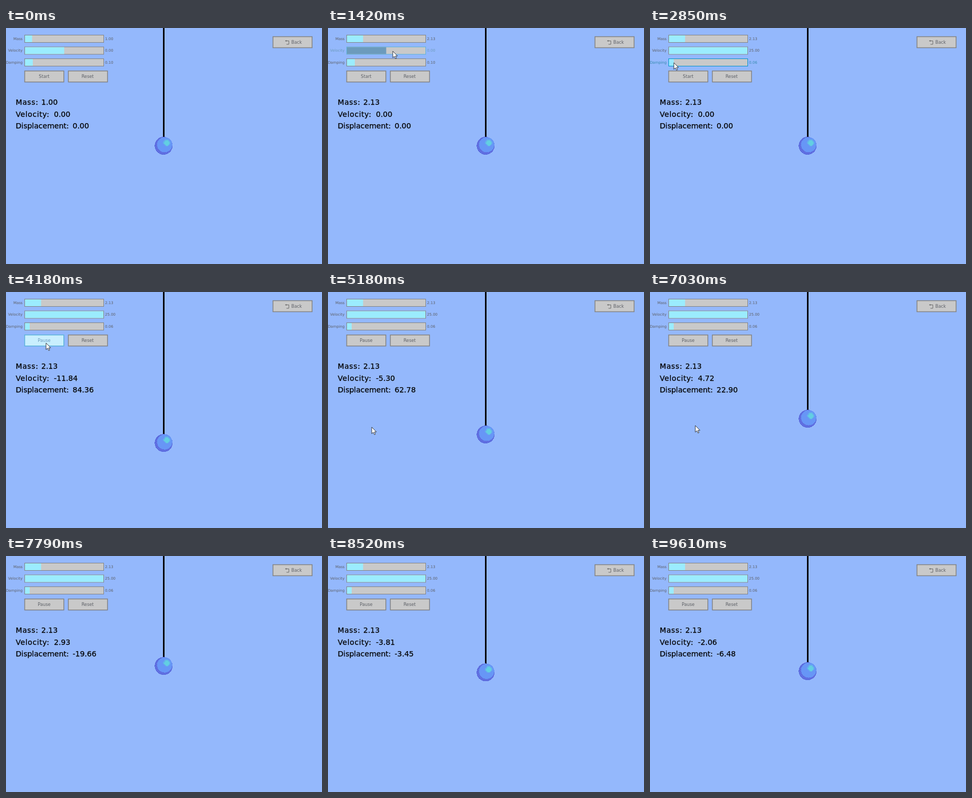
An HTML page that plays this animation: 600x449 px, repeating every 9.64 s.

```html
<!DOCTYPE html>
<html lang="en">
<head>
<meta charset="utf-8">
<title>Damped spring</title>
<style>
  html, body { margin: 0; width: 100%; height: 100%; overflow: hidden; background: #94b8fc; }
  svg { display: block; width: 600px; height: 449px; }
  text { font-family: "DejaVu Sans", sans-serif; white-space: pre; }
  .ui { --line: #838383; --base: #c9c9c9; --ink: #5e6168; --bar: #9becfe; }
  .ui.hot { --line: #5bb2d9; --base: #c9effe; --ink: #6c9bbc; --bar: #6c9bbc; }
  .ui.held { --line: #0492c7; --base: #97e8ff; --ink: #368baf; --bar: #97e8ff; }
  .ui text { fill: var(--ink); font-size: 7px; }
  .ui .box { fill: #c9c9c9; stroke: var(--line); }
  .ui .bar { fill: var(--bar); }
  .button .box { fill: var(--base); stroke-width: 1.5; }
  .button text { font-size: 8.3px; text-anchor: middle; }
  .end { text-anchor: end; }
  .stats { font-size: 14px; stroke: #000; stroke-width: .25; }
  .loose { letter-spacing: .6px; }
</style>
</head>
<body>
<svg viewBox="0 0 600 449" xmlns="http://www.w3.org/2000/svg">
  <defs>
    <pattern id="speck" width="4" height="4" patternUnits="userSpaceOnUse">
      <path d="M0 0h1.5v1.5h-1.5zM2 2h1.5v1.5h-1.5z" fill="#7283ee"/>
    </pattern>
    <pattern id="glint" width="3" height="3" patternUnits="userSpaceOnUse">
      <path d="M0 0h1.5v1.5h-1.5zM1.5 1.5h1.5v1.5h-1.5z" fill="#5fd0e0"/>
    </pattern>
  </defs>
  <rect width="600" height="449" fill="#94b8fc"/>

  <g id="sliders"></g>

  <g class="ui button" id="start">
    <rect class="box" x="35.5" y="81.7" width="74.3" height="21"/>
    <text id="startText" x="72.5" y="95">Start</text>
  </g>
  <g class="ui button">
    <rect class="box" x="118.4" y="81.7" width="74.3" height="21"/>
    <text x="155" y="95">Reset</text>
  </g>
  <g class="ui button">
    <rect class="box" x="506.9" y="16.5" width="74.3" height="21"/>
    <path d="M530 24.5h7v6.5h-4.5M532 23v3" fill="none" stroke="#686868"/>
    <text x="551.8" y="30">Back</text>
  </g>

  <g class="stats">
    <text class="loose" x="18.5" y="146">Mass:</text><text id="massOut" x="67" y="146"></text>
    <text class="loose" x="18.5" y="168.5">Velocity:</text><text id="velOut" x="91" y="168.5"></text>
    <text x="18.5" y="191">Displacement:</text><text id="dispOut" x="126.5" y="191"></text>
  </g>

  <rect id="rope" x="298" y="0" width="3" height="210"/>
  <g id="ball" shape-rendering="crispEdges">
    <circle r="17" fill="#5867dc"/>
    <circle r="16" fill="url(#speck)"/>
    <circle cx="2" cy="-2" r="14.4" fill="#6796f6"/>
    <path d="M-1 -7l4 -5h6l4 5v3l-5 5h-4l-5 -5z" fill="url(#glint)"/>
    <path d="M1 -6l3 -4h4l3 4v2l-4 4h-2l-4 -4z" fill="#62cfe2"/>
  </g>

  <path id="cursor" d="M0 0V12.6L3 9.9L5 14.4L7 13.5L5 9.2H8.9Z" fill="#fff" stroke="#20242c" stroke-width=".9" stroke-linejoin="round"/>
</svg>
<script>
const LOOP = 9640, SCALE = 0.75;
const $ = id => document.getElementById(id);

// Damped spring: amplitude, decay and angular speed per simulation unit
const AMP = 114.57, DECAY = 0.014184, OMEGA = 0.217084, LAG = 0.47;
const spring = s => AMP * Math.exp(-DECAY * s) * Math.sin(OMEGA * s);

// [ms, simulation units]
const clock = [[3830, 0], [4180, 9.795], [5180, 37.795], [7030, 90.52], [8520, 131.114], [9640, 162.76]];

// [ms, x, y] of the pointer tip
const path = [
  [150, 62, -14], [480, 49.6, 21], [600, 49.6, 21], [1090, 66.8, 21], [1150, 66.8, 21],
  [1420, 123, 44], [1540, 128, 44], [1850, 186, 45], [2030, 186, 45],
  [2400, 52, 65], [2470, 52, 65], [2900, 45, 66], [3240, 45, 66], [3570, 76, 97],
  [4250, 76, 97], [4620, 82, 235], [4900, 83, 257], [5700, 83, 257], [6000, 86, 254], [7450, 86, 254]
];

const sliders = [
  { name: "Mass", y: 13.5, min: 0.1, max: 10, init: 1, from: 570, to: 1110 },
  { name: "Velocity", y: 36, min: -25, max: 25, init: 0, from: 1530, to: 2010 },
  { name: "Damping", y: 58.5, min: 0, max: 1, init: 0.1, from: 2460, to: 3240 }
];

const smooth = p => p * p * (3 - 2 * p);

function track(keys, t, ease = p => p) {
  if (t <= keys[0][0]) return keys[0].slice(1);
  const i = keys.findIndex(k => k[0] > t);
  if (i < 0) return keys[keys.length - 1].slice(1);
  const a = keys[i - 1], b = keys[i];
  const p = ease((t - a[0]) / (b[0] - a[0]));
  return a.slice(1).map((v, j) => v + (b[j + 1] - v) * p);
}

const pointer = t => track(path, t, smooth);
const inside = ([px, py], x, y, w, h) => px >= x && px <= x + w && py >= y && py <= y + h;

for (const s of sliders) {
  $("sliders").insertAdjacentHTML("beforeend",
    `<g class="ui"><rect class="box" x="35.5" y="${s.y}" width="150" height="14"/>
     <rect class="bar" x="36" y="${s.y + 0.5}" height="13"/>
     <text class="end" x="31.5" y="${s.y + 9.3}">${s.name}</text>
     <text x="188" y="${s.y + 9.3}"></text></g>`);
  s.node = $("sliders").lastElementChild;
  s.bar = s.node.querySelector(".bar");
  s.out = s.node.lastElementChild;
}

function sliderValue(s, t) {
  if (t < s.from) return s.init;
  const x = pointer(Math.min(t, s.to))[0];
  const part = Math.min(1, Math.max(0, (x - 36) / 150));
  return s.min + (s.max - s.min) * part;
}

function setState(node, hot, held) {
  node.classList.toggle("hot", hot && !held);
  node.classList.toggle("held", held);
}

function draw(t) {
  const shown = t >= 150 && t < 7450;
  const tip = pointer(t);
  $("cursor").style.display = shown ? "" : "none";
  $("cursor").setAttribute("transform", `translate(${tip[0]} ${tip[1]})`);

  for (const s of sliders) {
    const value = sliderValue(s, t);
    s.bar.setAttribute("width", 149 * (value - s.min) / (s.max - s.min));
    s.out.textContent = value.toFixed(2);
    setState(s.node, shown && inside(tip, 35, s.y, 151, 14), t >= s.from && t < s.to);
  }

  setState($("start"), shown && inside(tip, 35, 81, 75, 22), t >= 3730 && t < 3830);
  $("startText").textContent = t < 3830 ? "Start" : "Pause";

  const units = track(clock, t)[0];
  const x = units > 0 ? spring(units) : 0;
  const v = units > 0 ? (x - spring(units - LAG)) / LAG : 0;
  $("massOut").textContent = sliderValue(sliders[0], t).toFixed(2);
  $("velOut").textContent = v.toFixed(2);
  $("dispOut").textContent = x.toFixed(2);

  const y = 224 + x * SCALE;
  $("ball").setAttribute("transform", `translate(299.3 ${y})`);
  $("rope").setAttribute("height", y - 14);
}

const begin = performance.now();
function frame() {
  draw((performance.now() - begin) % LOOP);
  requestAnimationFrame(frame);
}
frame();
</script>
</body>
</html>
```
